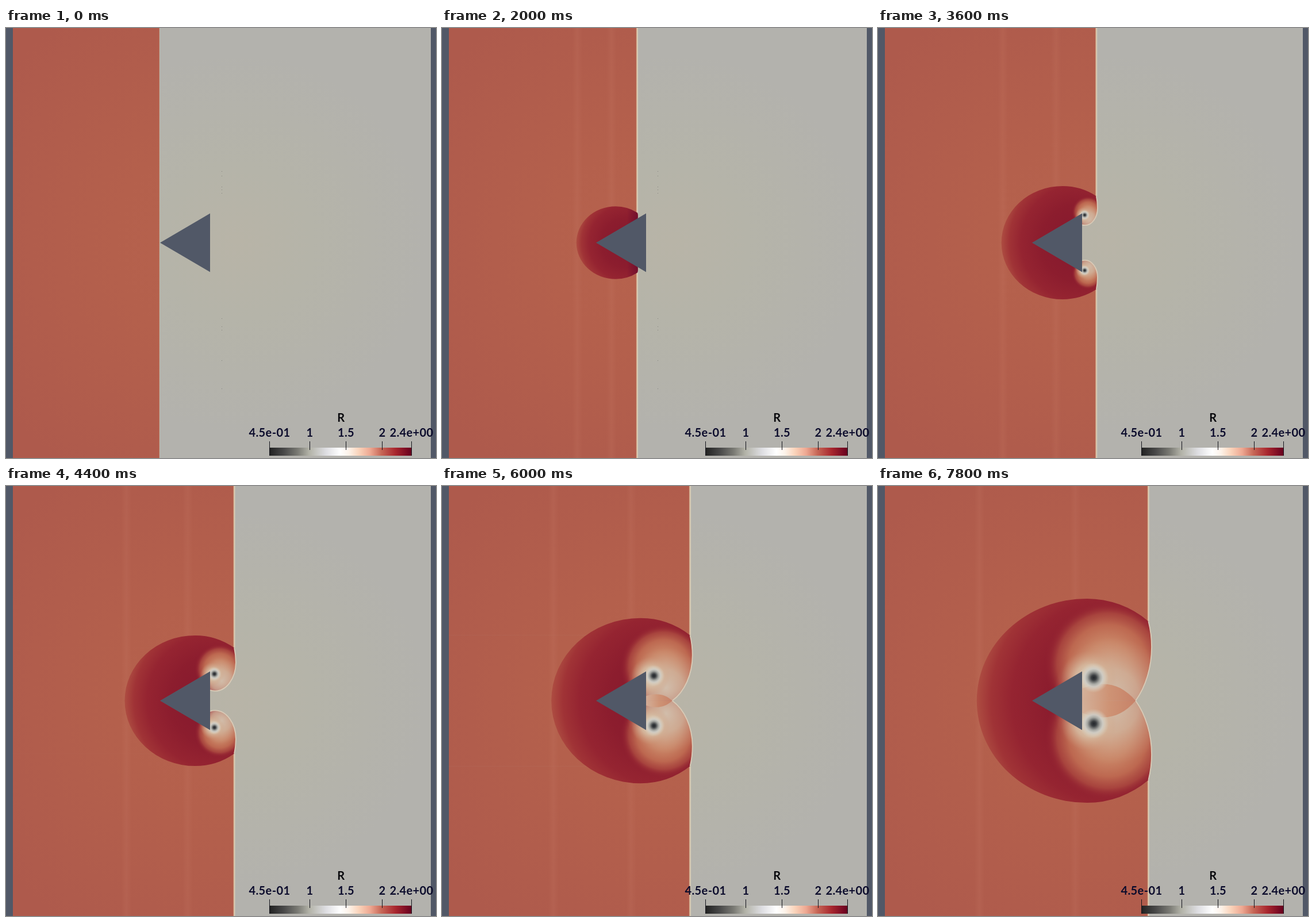
These frames come from a looping animation (748 by 748 pixels, 8000 ms). An HTML page with a canvas:

```html
<!DOCTYPE html>
<html lang="en">
<head>
<meta charset="utf-8">
<title>Shock wave passing a wedge</title>
<style>
  html, body { margin: 0; width: 100%; height: 100%; overflow: hidden; }
  canvas { display: block; }
</style>
</head>
<body>
<canvas id="stage" width="748" height="748"></canvas>
<script>
const ctx = document.getElementById('stage').getContext('2d');
const SIZE = 748, AXIS = 373.5, STEP = 200, LOOP = 8000;
const APEX = 268, BASE = 355, HALF = 50.5;
const SOLID = 'rgb(81,88,103)', RIM = 'rgb(217,203,183)';

function withStops(gradient, stops) {
  for (const [at, color] of stops) gradient.addColorStop(at, `rgba(${color})`);
  return gradient;
}
const radial = (x, y, r, stops) => withStops(ctx.createRadialGradient(x, y, 0, x, y, r), stops);
const linear = (x0, x1, stops) => withStops(ctx.createLinearGradient(x0, 0, x1, 0), stops);

function box(x, y, w, h, fill) {
  ctx.fillStyle = fill;
  ctx.fillRect(x, y, w, h);
}

// Distance the shock has travelled from the wedge tip; it slows at the base.
const travel = step => step < 12 ? 7.25 * step : 87 + 4.31 * (step - 12);

function drawBackground() {
  box(0, 0, SIZE, SIZE, radial(400, AXIS, 330,
    [[0, '184,180,167,1'], [0.4, '181,180,169,1'], [1, '179,178,173,1']]));
  for (const y of [249, 257, 276, 281, 287, 505, 519, 525, 578, 627])
    box(375, y, 1, 1, 'rgba(110,110,108,.7)');
}

// Curved wave around the base corner, as an ellipse growing with its age.
function cornerWave(age) {
  const wave = {
    x: BASE + 0.2 * age, y: -HALF - 0.37 * age,
    rx: 0.84 * age, ry: 1.15 * age
  };
  const reach = -wave.y / wave.ry;
  wave.crossed = reach < 1;
  wave.end = wave.crossed ? Math.asin(reach) : 1.81;
  wave.tip = wave.x + wave.rx * Math.cos(wave.end);
  return wave;
}

function traceStem(front, kink, wave) {
  if (wave) {
    const right = wave.x + wave.rx;
    ctx.quadraticCurveTo(right, (kink + wave.y) / 2, right, wave.y);
    ctx.ellipse(wave.x, wave.y, wave.rx, wave.ry, 0, 0, wave.end);
  } else {
    ctx.quadraticCurveTo(front + 2, kink + 2, front + 1, (APEX - front) * HALF / (BASE - APEX));
  }
}

function traceBow(s, front, kink, centre) {
  const left = 0.943 * s, height = 0.873 * s, end = Math.asin(kink / height);
  ctx.moveTo(centre - left, 0.5);
  ctx.ellipse(centre, 0, left, height, 0, Math.PI, 1.5 * Math.PI);
  ctx.ellipse(centre, 0, (front - centre) / Math.cos(end), height, 0, -Math.PI / 2, end);
}

function drawHotGas(s, front, kink) {
  const hot = radial(380, 0, 480, [[0, '183,99,78,1'], [0.4, '180,96,76,1'], [1, '174,90,76,1']]);
  box(12, -AXIS - 1, front - 12, AXIS + 1 + kink, hot);
  box(12, kink - 0.5, Math.min(front, BASE) - 12, 1 - kink, hot);
  if (!s) return;
  for (const x of [APEX - 0.45 * s, APEX + 0.37 * s])
    box(x - 9, -AXIS - 1, 18, AXIS + 1,
      linear(x - 9, x + 9, [[0, '198,120,100,0'], [0.5, '198,120,100,.2'], [1, '198,120,100,0']]));
}

function drawExpansion(age) {
  const glow = (x, y, r, stops) => box(150, -400, 400, 400.5, radial(x, y, r, stops));
  glow(BASE + 0.39 * age, -HALF - 0.11 * age, 0.92 * age + 4, [
    [0, '209,157,125,1'], [0.35, '201,133,102,1'], [0.62, '189,104,80,1'],
    [0.8, '172,74,64,.85'], [0.91, '155,45,53,.4'], [1, '145,33,48,0']]);
  glow(BASE + 0.45 * age, -HALF + 0.36 * age, 0.85 * age + 3, [
    [0, '210,193,175,.95'], [0.45, '208,182,160,.75'], [1, '205,150,125,0']]);
  glow(BASE + 0.1 * age, -HALF + 0.1 * age, 0.38 * age + 4, [
    [0, '220,208,188,.95'], [0.5, '216,196,170,.7'], [1, '208,160,130,0']]);
}

function drawLens(age, tip) {
  const height = 29 * Math.pow(Math.max(0, age - 62) / 52, 0.75);
  const width = tip - BASE;
  ctx.beginPath();
  ctx.moveTo(BASE, 0.5);
  ctx.lineTo(BASE, -0.7 * height);
  ctx.bezierCurveTo(BASE + 0.4 * width, -1.2 * height, BASE + 0.72 * width, -height, tip, 0);
  ctx.lineTo(tip, 0.5);
  ctx.fillStyle = linear(BASE, tip, [[0, '212,176,153,.9'], [0.5, '206,147,117,1'], [1, '199,130,104,1']]);
  ctx.fill();
}

function drawVortex(age) {
  const x = BASE + 0.175 * age, y = -HALF + 0.09 * age, r = 0.19 * age + 4;
  box(x - r, y - r, 2 * r, 2 * r, radial(x, y, r, [
    [0, '35,38,42,1'], [0.16, '58,61,64,1'], [0.42, '165,166,161,1'],
    [0.6, '205,204,198,.9'], [0.75, '214,208,196,.6'], [1, '217,205,185,0']]));
}

function drawDisturbedGas(s, front, kink, age, wave) {
  const centre = APEX + 0.47 * s;
  ctx.save();
  ctx.beginPath();
  traceBow(s, front, kink, centre);
  traceStem(front, kink, wave);
  if (wave) ctx.lineTo(BASE, wave.crossed ? 0.5 : -HALF);
  ctx.lineTo(APEX, 0.5);
  ctx.closePath();
  ctx.clip();
  box(150, -AXIS, 400, AXIS + 1, radial(centre + 0.25 * s, 0, 1.19 * s, [
    [0, '132,24,46,1'], [0.5, '140,29,46,1'], [0.75, '149,36,49,1'],
    [0.9, '160,51,54,1'], [1, '173,76,65,1']]));
  if (wave) {
    drawExpansion(age);
    if (wave.crossed) drawLens(age, wave.tip);
    drawVortex(age);
  } else {
    box(front - 18, -AXIS, 20, AXIS, linear(front - 18, front, [[0, '105,10,45,0'], [1, '105,10,45,.7']]));
  }
  ctx.restore();

  if (wave) {
    ctx.beginPath();
    ctx.moveTo(front, kink);
    traceStem(front, kink, wave);
    ctx.strokeStyle = RIM;
    ctx.lineWidth = 1.8;
    ctx.stroke();
  }
}

function drawHalf(s, sign) {
  const front = 267 + s, age = s - 87;
  const kink = -Math.min(0.721 * s, 10 + 0.63 * s);
  const wave = age > 0 ? cornerWave(age) : null;

  ctx.save();
  ctx.translate(0, AXIS);
  ctx.scale(1, sign);
  drawHotGas(s, front, kink);
  const lineWidth = s ? 3.5 : 1;
  box(front - lineWidth / 2, -AXIS - 1, lineWidth, AXIS + 1 + kink,
    linear(front - lineWidth / 2, front + lineWidth / 2,
      [[0, '198,138,110,1'], [0.5, '222,205,178,1'], [1, '194,191,179,1']]));
  if (s) drawDisturbedGas(s, front, kink, age, wave);
  ctx.restore();
}

function drawSolids() {
  box(0, 0, 12, SIZE, SOLID);
  box(739, 0, 9, SIZE, SOLID);
  ctx.beginPath();
  ctx.moveTo(APEX, AXIS);
  ctx.lineTo(BASE, AXIS - HALF - 0.5);
  ctx.lineTo(BASE, AXIS + HALF + 0.5);
  ctx.fill();
}

function drawLegend() {
  box(458, 730, 247, 14, linear(458, 705, [
    [0, '33,33,33,1'], [0.1, '72,72,72,1'], [0.2, '122,122,116,1'], [0.28, '178,178,167,1'],
    [0.4, '222,222,226,1'], [0.5, '255,255,255,1'], [0.56, '253,243,234,1'],
    [0.63, '250,212,187,1'], [0.71, '238,168,146,1'], [0.79, '198,102,86,1'],
    [0.89, '168,38,46,1'], [1, '103,0,31,1']]));
  ctx.textAlign = 'center';
  ctx.font = '700 20px Lato, sans-serif';
  ctx.letterSpacing = '0.4px';
  const labels = [[458, '4.5e-01'], [528, '1'], [591, '1.5'], [654, '2'], [705, '2.4e+00']];
  for (const [x, label] of labels) {
    box(x, 719, 1, x === 458 || x === 705 ? 25 : 15, '#14141c');
    ctx.fillStyle = '#0c0c2c';
    ctx.fillText(label, x + 0.5, 710.5);
  }
  ctx.fillStyle = '#08080c';
  ctx.fillText('R', 583, 685);
}

function draw(time) {
  const s = travel(Math.floor(time % LOOP / STEP));
  drawBackground();
  drawHalf(s, 1);
  drawHalf(s, -1);
  drawSolids();
  drawLegend();
}

const start = performance.now();
function tick() {
  draw(performance.now() - start);
  requestAnimationFrame(tick);
}
tick();
</script>
</body>
</html>
```
